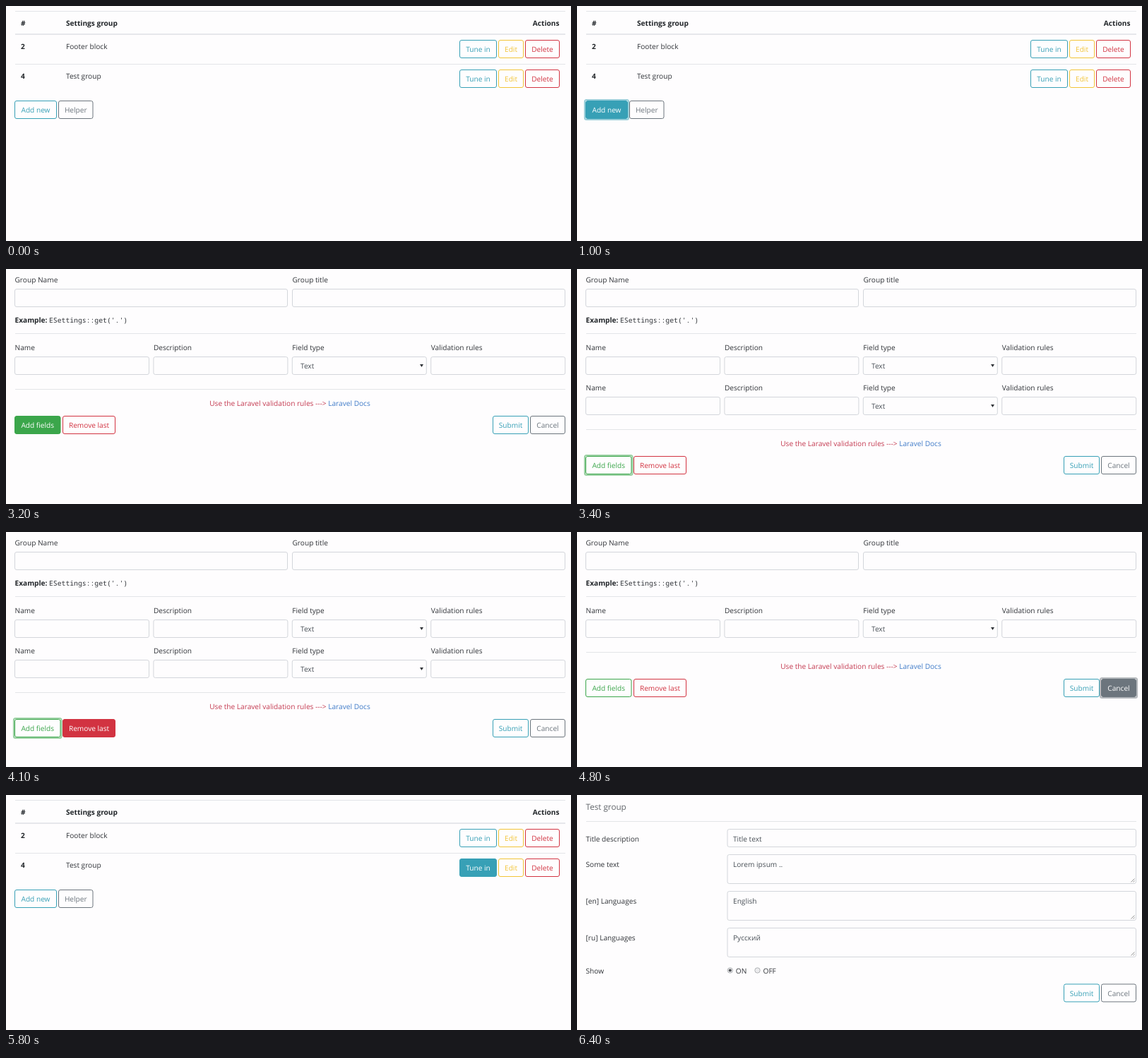
Write an HTML page that moves like this. It is 800 px wide and 333 px high and loops after 8000 ms.

```html
<!DOCTYPE html>
<html lang="en">
<head>
<meta charset="utf-8">
<title>Settings groups</title>
<style>
  html, body { margin: 0; width: 100%; height: 100%; overflow: hidden; background: #fefdfe; }
  svg { display: block; }
  text { font: 10.15px "Open Sans", "Noto Sans", sans-serif; fill: #303338; text-rendering: geometricPrecision; white-space: pre; }
  .bold { font-weight: 700; fill: #212529; }
  .code { font: 9.75px "Noto Sans Mono", monospace; }
  .value { fill: #495057; }
  .heading { font-size: 11.7px; fill: #62666b; }
  .input { fill: #fefdfe; stroke: #d3d6db; }
</style>
</head>
<body>
<svg id="stage" width="800" height="333" viewBox="0 0 800 333"></svg>
<script>
const INFO = '#37a0b6', WARNING = '#f2c438', DANGER = '#d23341', SUCCESS = '#3ba64b', GRAY = '#6c757d';

// y is the vertical middle of the capitals
const text = (x, y, s, attrs = '') => `<text x="${x}" y="${y + 3.7}" ${attrs}>${s}</text>`;
const bold = (x, y, s, attrs = '') => text(x, y, s, 'class="bold" ' + attrs);
const rule = (y, color = '#e3e5e8', w = 1) => `<path d="M13 ${y}H792" stroke="${color}" stroke-width="${w}"/>`;
const box = (x, y, w, h, attrs) => `<rect x="${x}" y="${y}" width="${w}" height="${h}" rx="2.5" ${attrs}/>`;
const input = (x, y, w, h = 25) => box(x, y, w, h, 'class="input"');

// state: '' | 'hover' | 'focus' | 'hover focus'
function button(x, y, w, label, color, state = '') {
  const hover = state.includes('hover');
  const ring = state.includes('focus')
    ? box(x - 1.5, y - 1.5, w + 3, 28, `fill="none" stroke="${color}" stroke-width="2.2" opacity=".5"`) : '';
  return ring + box(x, y, w, 25, `fill="${hover ? color : '#fefdfe'}" stroke="${color}"`) +
    text(x + w / 2, y + 13, label, `text-anchor="middle" style="fill:${hover ? '#fff' : color}"`);
}

const submitRow = (y, cancel) =>
  button(689.5, y, 50, 'Submit', INFO) + button(742.5, y, 49, 'Cancel', GRAY, cancel);

function list({ add, tune }) {
  const row = (y, id, name, state) => bold(21, y, id) + text(85, y, name) +
    button(642.5, y - 8.5, 52, 'Tune in', INFO, state) +
    button(697.5, y - 8.5, 35, 'Edit', WARNING) +
    button(735.5, y - 8.5, 48, 'Delete', DANGER);
  return rule(7.5) + bold(21, 24, '#') + bold(85, 24, 'Settings group') +
    bold(783.5, 24, 'Actions', 'text-anchor="end"') + rule(40, '#dee1e5', 1.4) +
    row(57, 2, 'Footer block') + rule(82.5) + row(99, 4, 'Test group', tune) +
    button(12.5, 134.5, 59, 'Add new', INFO, add) +
    button(74.5, 134.5, 48.5, 'Helper', GRAY);
}

function fieldRow(y) {
  const labels = ['Name', 'Description', 'Field type', 'Validation rules'];
  return labels.map((s, i) => {
    const x = 12.5 + i * 196.4;
    return text(x, y, s) + input(x, y + 13.5, 190);
  }).join('') + text(417, y + 26.5, 'Text', 'class="value"') +
    `<path d="M586 ${y + 24}h5l-2.5 4z" fill="#303338"/>`;
}

function groupForm({ rows = 1, add, remove, cancel }) {
  const dy = (rows - 1) * 57;
  let out = text(12.5, 15, 'Group Name') + text(405.5, 15, 'Group title') +
    input(12.5, 28.5, 386) + input(405.5, 28.5, 386) +
    bold(12.5, 72.5, 'Example:') + text(61, 72.5, "ESettings::get('.')", 'class="code"') + rule(91.5);
  for (let i = 0; i < rows; i++) out += fieldRow(111 + i * 57);
  return out + rule(170.5 + dy) +
    text(402, 190 + dy, '<tspan fill="#c43a50">Use the Laravel validation rules ---&gt; </tspan><tspan fill="#3f7bc8">Laravel Docs</tspan>', 'text-anchor="middle"') +
    button(12.5, 208.5 + dy, 64.5, 'Add fields', SUCCESS, add) +
    button(80.5, 208.5 + dy, 74, 'Remove last', DANGER, remove) +
    submitRow(208.5 + dy, cancel);
}

function valuesForm() {
  const area = (y, label, value) => text(12.5, y, label) + input(213, y - 13.5, 578.5, 41) +
    text(221, y, value, 'class="value"') +
    `<path d="M784.5 ${y + 25.5}l5 -5m-2 5l2 -2" stroke="#777" stroke-width=".8"/>`;
  const radio = (x, label, on) =>
    `<circle cx="${x}" cy="248.5" r="3.7" fill="#ececee" stroke="#a9abae" stroke-width=".9"/>` +
    (on ? `<circle cx="${x}" cy="248.5" r="2.1" fill="#505357"/>` : '') + text(x + 8, 249, label);
  return text(12.5, 17.5, 'Test group', 'class="heading"') + rule(37.5) +
    text(12.5, 62, 'Title description') + input(213, 48.5, 578.5) + text(221, 62, 'Title text', 'class="value"') +
    area(98, 'Some text', 'Lorem ipsum ..') +
    area(150, '[en] Languages', 'English') +
    area(202, '[ru] Languages', 'Русский') +
    text(12.5, 249, 'Show') + radio(216.8, 'ON', true) + radio(255.5, 'OFF') + submitRow(268);
}

// [start in ms, scene, state]
const steps = [
  [0, list, {}],
  [1000, list, { add: 'hover focus' }],
  [1200, groupForm, {}],
  [3200, groupForm, { add: 'hover' }],
  [3400, groupForm, { rows: 2, add: 'focus' }],
  [4100, groupForm, { rows: 2, add: 'focus', remove: 'hover' }],
  [4300, groupForm, { remove: 'focus' }],
  [4800, groupForm, { cancel: 'hover focus' }],
  [5000, list, {}],
  [5800, list, { tune: 'hover' }],
  [6400, valuesForm, {}],
];

const stage = document.getElementById('stage');
const start = performance.now();
let shown;

function tick() {
  const t = Math.max(0, performance.now() - start) % 8000;
  const step = steps.findLast(s => s[0] <= t);
  if (step !== shown) {
    shown = step;
    stage.innerHTML = step[1](step[2]);
  }
  requestAnimationFrame(tick);
}
tick();
</script>
</body>
</html>
```
